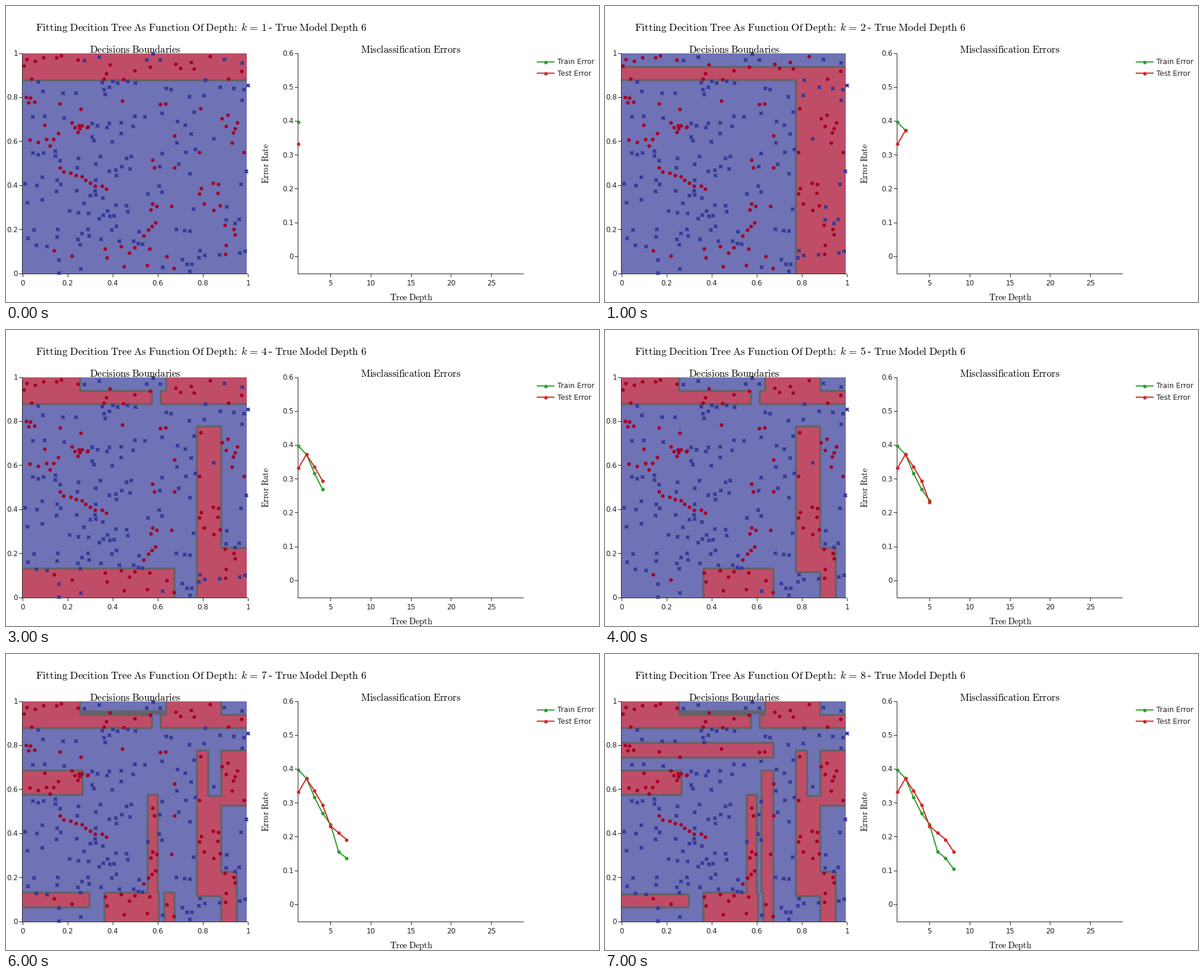
A matplotlib script for the animation above (8 s loop, 1000 by 500 pixels).

```python
import numpy as np
import matplotlib.pyplot as plt
from matplotlib.animation import FuncAnimation
from matplotlib.patches import Rectangle

plt.rcParams["font.family"] = "DejaVu Sans"
plt.rcParams["mathtext.fontset"] = "cm"

PT = 0.72  # points per pixel at 100 dpi
INK = "#242424"
RED_FILL, BLUE_FILL, EDGE = "#c04d67", "#6f72b5", "#646266"
RED_DOT, BLUE_CROSS = "#a50026", "#313695"
GREEN, RED = "#2ca02c", "#d62728"

LEFT, TOP, WIDTH, HEIGHT = 28, 80, 380, 372
ERROR_LEFT = 493

# Decision tree: (majority, axis, cut, low side, high side); a letter is a leaf
TOP_STRIP = ("B", "y", 103,
             ("B", "x", 125, "R",
              ("B", "x", 270,
               ("B", "y", 97, "B", ("B", "y", 100, "R", "B")),
               ("R", "x", 363, "R", "B"))),
             ("R", "x", 261, ("R", "x", 246, "R", "B"), "R"))
RIGHT_SIDE = ("R", "x", 363,
              ("R", "y", 163, "B",
               ("R", "y", 409,
                ("R", "y", 240, ("R", "x", 341, "R", "B"), "R"),
                "B")),
              ("B", "y", 368,
               ("B", "y", 163, "B", ("B", "y", 256, "R", "B")),
               ("R", "x", 389, "R", "B")))
MIDDLE = ("B", "x", 284,
          ("B", "y", 238,
           ("B", "y", 197,
            ("B", "y", 175, ("B", "y", 150, "B", "R"), "B"),
            ("R", "x", 129, "R", ("B", "x", 264, "B", "R"))),
           ("B", "x", 239, "B",
            ("R", "x", 256, "R", ("B", "x", 264, "B", "R")))),
          "B")
BOTTOM = ("B", "x", 284,
          ("R", "x", 166,
           ("B", "y", 428,
            ("R", "x", 141, ("R", "y", 406, "B", "R"), "B"),
            "B"),
           ("R", "x", 258, "R", ("B", "x", 267, "B", "R"))),
          "B")
TREE = ("B", "y", 125, ("R",) + TOP_STRIP[1:],
        ("B", "x", 322, ("B", "y", 403, MIDDLE, BOTTOM), RIGHT_SIDE))

TRAIN = [0.397, 0.373, 0.317, 0.270, 0.237, 0.156, 0.137, 0.105]
TEST = [0.332, 0.372, 0.336, 0.295, 0.232, 0.212, 0.192, 0.156]


def is_red(x, y, depth, node=TREE):
    """Class of each position when the tree is cut off at a depth."""
    if depth == 0 or isinstance(node, str):
        return np.full(np.shape(x), node[0] == "R")
    _, axis, cut, low, high = node
    below = (x if axis == "x" else y) < cut
    return np.where(below, is_red(x, y, depth - 1, low),
                    is_red(x, y, depth - 1, high))


def sample_points(dot_count, cross_count, gap=6.5):
    """Random points labelled by the full tree, plus streaks of stray dots."""
    rng = np.random.default_rng(11)
    dots, crosses = [], []
    for start, end, count in [((118, 205), (139, 204), 6),
                              ((90, 274), (169, 310), 10),
                              ((235, 386), (250, 368), 4)]:
        dots += list(np.linspace(start, end, count)
                     + rng.uniform(-3, 3, (count, 2)))
    while len(dots) < dot_count or len(crosses) < cross_count:
        point = rng.uniform((LEFT, TOP), (LEFT + WIDTH, TOP + HEIGHT))
        group, limit = ((dots, dot_count) if is_red(*point, 8)
                        else (crosses, cross_count))
        distances = np.linalg.norm(np.array(dots + crosses) - point, axis=1)
        if len(group) < limit and distances.min() > gap:
            group.append(point)
    return np.array(dots), np.array(crosses)


def error_x(depth):
    return ERROR_LEFT + WIDTH * (depth - 1) / 28


def error_y(rate):
    return TOP + HEIGHT * (0.6 - rate) / 0.65


fig = plt.figure(figsize=(10, 5), dpi=100, facecolor="white")
ax = fig.add_axes([0, 0, 1, 1])
ax.axis("off")


def fix_view():
    ax.set_xlim(0, 1000)
    ax.set_ylim(500, 0)


fix_view()


def clip_box(left, width):
    return ax.add_patch(Rectangle((left, TOP), width, HEIGHT,
                                  fc="none", ec="none"))


def stroke(xs, ys, color=INK, width=1, **kw):
    return ax.plot(xs, ys, color=color, lw=width * PT, snap=False,
                   solid_capstyle="butt", **kw)[0]


def label(x, y, text, ha="center", size=12, color=INK, **kw):
    return ax.text(x, y, text, ha=ha, va="baseline", fontsize=size * PT,
                   color=color, **kw)


def roman(x, y, text, size, ha="center", **kw):
    body = text.replace(" ", r"\;").replace(":", r"\text{:}")
    return label(x, y, rf"$\mathrm{{{body}}}$", ha, size, "black", **kw)


def axes_frame(left, xticks, yticks):
    bottom = TOP + HEIGHT
    stroke([left - 0.5] * 2, [TOP, bottom + 1], zorder=6)
    stroke([left - 1, left + WIDTH], [bottom + 0.5] * 2, zorder=1)
    for x, text in xticks:
        stroke([np.floor(x) + 0.5] * 2, [bottom + 1, bottom + 6])
        label(x, bottom + 20, text)
    for y, text in yticks:
        stroke([left - 6, left - 1], [np.floor(y) + 0.5] * 2)
        label(left - 8, y + 4, text, ha="right")


unit = np.arange(6) / 5
rates = np.arange(7) / 10
axes_frame(LEFT, [(LEFT + WIDTH * v, f"{v:g}") for v in unit],
           [(TOP + HEIGHT * (1 - v), f"{v:g}") for v in unit])
axes_frame(ERROR_LEFT, [(error_x(d), str(d)) for d in range(5, 30, 5)],
           [(error_y(v), f"{v:g}") for v in rates])

roman(50, 42, "Fitting Decition Tree As Function Of Depth:", 17.6, "left")
depth_text = label(396.5, 42, "", "left", 17.6, "black")
stroke([443, 448], [37.5, 37.5], "black", 1.3)
roman(453, 42, "True Model Depth 6", 17.6, "left")
roman(217.5, 79, "Decisions Boundaries", 16.6, zorder=8)
roman(682, 79, "Misclassification Errors", 16.6)
roman(683, 497, "Tree Depth", 14.4)
roman(443, 265.5, "Error Rate", 14.3, rotation=90, rotation_mode="anchor")

for y, color, text in [(94.5, GREEN, "Train Error"), (113.5, RED, "Test Error")]:
    stroke([895, 925], [y, y], color, 2)
    stroke([910], [y], color, marker="o", ms=6 * PT, mew=0)
    label(930, y + 4, text, "left")

left_clip = clip_box(LEFT, WIDTH)
fill_clip = clip_box(LEFT, WIDTH - 2)
right_clip = clip_box(ERROR_LEFT - 0.5, WIDTH)

dots, crosses = sample_points(102, 146)
for points, marker, size, color in [(dots, "o", 6.2, RED_DOT),
                                    (crosses, "X", 7, BLUE_CROSS)]:
    stroke(*points.T, color, ls="none", marker=marker, ms=size * PT, mew=0,
           zorder=5, clip_path=left_clip)

curves = [(errors, stroke([], [], color, 2, marker="o", ms=6 * PT, mew=0,
                          zorder=7, clip_path=right_clip))
          for errors, color in [(TRAIN, GREEN), (TEST, RED)]]

grid_x, grid_y = np.meshgrid(np.arange(LEFT - 0.5, LEFT + WIDTH),
                             np.arange(TOP - 0.5, TOP + HEIGHT + 1))
surface = []


def draw(frame):
    depth = frame + 1
    while surface:
        surface.pop().remove()
    mask = is_red(grid_x, grid_y, depth).astype(float)
    fill = ax.contourf(grid_x, grid_y, mask, levels=[-1, 0.5, 2],
                       colors=[BLUE_FILL, RED_FILL], zorder=2)
    edge = ax.contour(grid_x, grid_y, mask, levels=[0.5], colors=[EDGE],
                      linewidths=3.4 * PT, zorder=3)
    edge.set_joinstyle("round")
    for part in (fill, edge):
        part.set_clip_path(fill_clip)
        surface.append(part)
    fix_view()

    depth_text.set_text(rf"$k\,=\,{depth}$")
    for errors, line in curves:
        line.set_data(error_x(np.arange(1, depth + 1)),
                      error_y(np.array(errors[:depth])))
    return []


anim = FuncAnimation(fig, draw, frames=8, interval=1000, repeat=True,
                     repeat_delay=0, blit=False)
plt.show()
```
